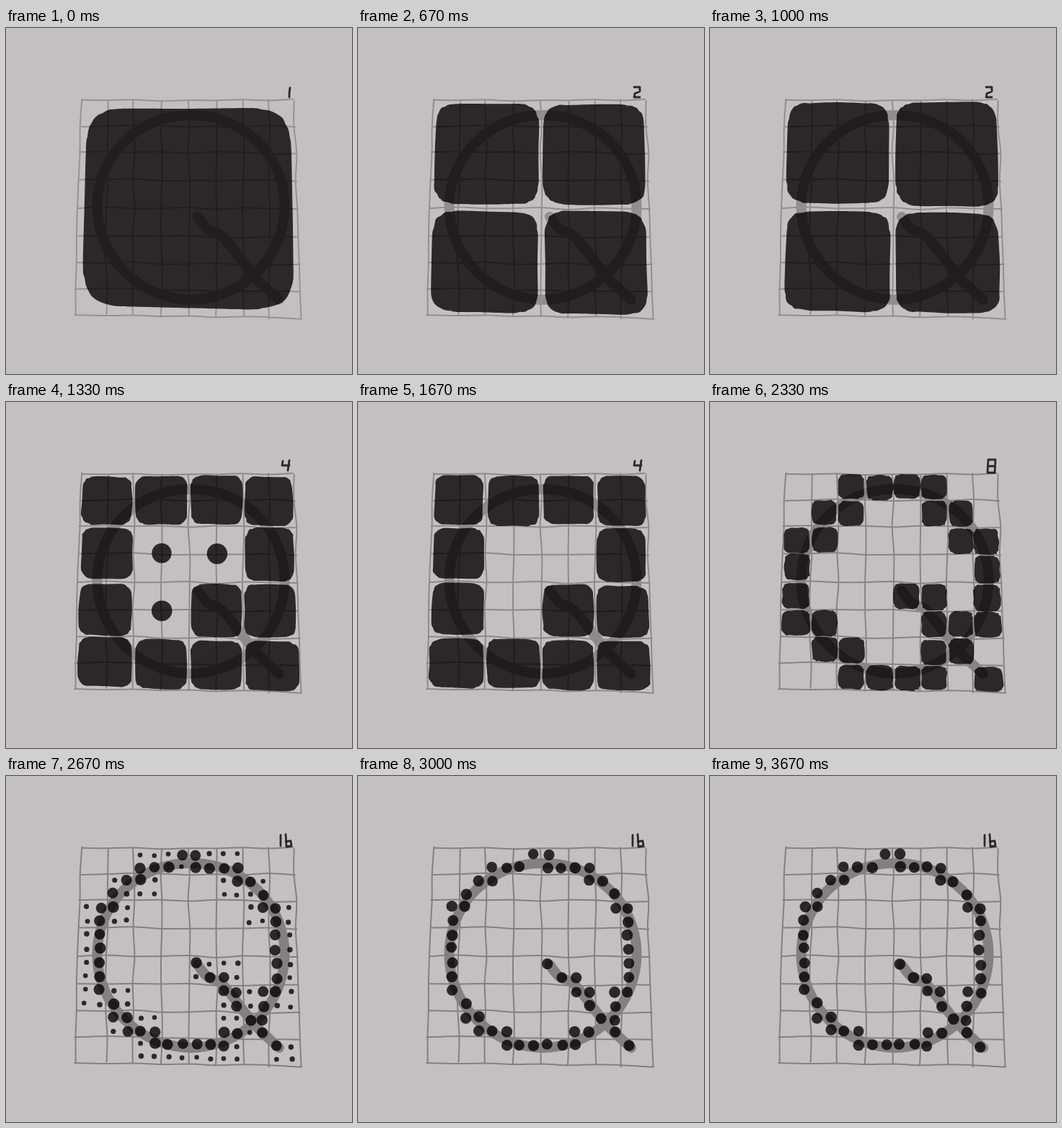
An HTML page with a canvas that plays this animation: 480 by 480 pixels, repeating every 4010 ms.

```html
<!DOCTYPE html>
<html lang="en">
<head>
<meta charset="utf-8">
<title>Q on a finer and finer grid</title>
<style>
html, body { margin: 0; width: 100%; height: 100%; overflow: hidden; background: #c4c0c1; }
canvas { display: block; width: 480px; height: 480px; }
</style>
</head>
<body>
<canvas id="stage" width="480" height="480"></canvas>
<script>
const SIZE = 480, LOOP = 4010, POSE_COUNT = 12;
const PAPER = '#c4c0c1', INK = '#2c2829';
const { PI, sin, cos, abs, sign, floor, hypot } = Math;
const ctx = document.getElementById('stage').getContext('2d');

const range = n => Array.from({ length: n }, (_, i) => i);

// Seeded values between -1 and 1.
function randomFrom(seed) {
  let s = seed * 7919 + 17;
  const next = () => {
    s = (s * 16807) % 2147483647;
    return s / 2147483647 * 2 - 1;
  };
  next();
  return next;
}

// Hand-drawn square: u and v run from 0 to 1, the outer sides flare downwards.
function warp(u, v) {
  return [
    104 + 294 * u + 2.2 - 2.8 * sin(2 * PI * u + 0.3) + 10 * v * (2 * u - 1) ** 7,
    100 + 297 * v + 6 * u * v - 2 * sin(2 * PI * v)
  ];
}

function unwarp(x, y) {
  let u = (x - 104) / 294, v = (y - 100) / 300;
  for (let i = 0; i < 5; i++) {
    const [wx, wy] = warp(u, v);
    u += (x - wx) / 294;
    v += (y - wy) / 300;
  }
  return [u, v];
}

// The letter: a slightly flattened ring and a bent tail.
const TAIL = [[266, 262], [280, 279], [302, 291], [345, 345], [379, 377]];

function ring(a) {
  const r = 1 - 0.015 * sin(a) * abs(cos(a));
  return [256.5 + 130 * r * cos(a), 249 + 128 * r * sin(a)];
}

function letterSamples() {
  const samples = range(800).map(i => ring(i / 800 * 2 * PI));
  TAIL.slice(1).forEach(([x, y], i) => {
    const [px, py] = TAIL[i], length = hypot(x - px, y - py);
    for (let d = 0; d < length; d++)
      samples.push([px + (x - px) * d / length, py + (y - py) * d / length]);
  });
  return samples;
}

// The cells follow the letter from a little up and to the left.
const LETTER_UV = letterSamples().map(([x, y]) => unwarp(x - 4, y - 4));

// Cells of an n by n grid that the letter crosses for more than a touch.
function crossedCells(n) {
  const counts = new Map();
  for (const [u, v] of LETTER_UV) {
    const key = floor(v * n) * n + floor(u * n);
    counts.set(key, (counts.get(key) || 0) + 1);
  }
  const least = 295 / n * 0.13;
  return new Set([...counts.keys()].filter(key => counts.get(key) > least));
}
const crossed = Object.fromEntries([1, 2, 4, 8, 16].map(n => [n, crossedCells(n)]));

// Cells left empty inside the crossed cells of the coarser grid.
function emptyCells(n) {
  const half = n / 2;
  return range(n * n).filter(key => {
    const parent = floor(key / n / 2) * half + floor(key % n / 2);
    return crossed[half].has(parent) && !crossed[n].has(key);
  });
}

const cellCentre = (key, n) => [(key % n + 0.5) / n, (floor(key / n) + 0.5) / n];

function trace(c, points, closed) {
  const n = points.length;
  const at = i => closed ? points[(i + n) % n] : points[Math.max(0, Math.min(n - 1, i))];
  c.beginPath();
  c.moveTo(...points[0]);
  for (const i of range(closed ? n : n - 1)) {
    const [a, b, d, e] = [at(i - 1), at(i), at(i + 1), at(i + 2)];
    c.bezierCurveTo(b[0] + (d[0] - a[0]) / 6, b[1] + (d[1] - a[1]) / 6,
      d[0] - (e[0] - b[0]) / 6, d[1] - (e[1] - b[1]) / 6, ...d);
  }
  if (closed) c.closePath();
}

function makeOverlay() {
  const layer = document.createElement('canvas');
  layer.width = layer.height = SIZE;
  const c = layer.getContext('2d');
  c.lineCap = c.lineJoin = 'round';
  const stroke = (points, width, closed) => {
    c.lineWidth = width;
    trace(c, points, closed);
    c.stroke();
  };
  const random = randomFrom(5);
  for (const line of range(9)) {
    const wobble = ([x, y]) => [x + random() * 1.5, y + random() * 1.5];
    stroke(range(9).map(i => wobble(warp(line / 8, i / 8))), 2);
    stroke(range(9).map(i => wobble(warp(i / 8, line / 8))), 2);
  }
  stroke(range(40).map(i => ring(i / 40 * 2 * PI)), 14, true);
  stroke(TAIL, 14);
  return layer;
}
const overlay = makeOverlay();

// Rounded square bent with the grid; corners soften as the cells shrink.
function drawBlobs(n, seed) {
  const random = randomFrom(seed), power = 7.2 - Math.log2(n);
  const bend = t => sign(t) * abs(t) ** (2 / power);
  const count = n < 4 ? 44 : 28;
  for (const key of crossed[n]) {
    const [u, v] = cellCentre(key, n);
    const [dx, dy] = [random(), random()];
    const [w, h] = [0, 0].map(() => (0.94 + random() * 0.02) / n / 2);
    trace(ctx, range(count).map(i => {
      const a = i / count * 2 * PI;
      const [x, y] = warp(u + bend(cos(a)) * w, v + bend(sin(a)) * h);
      return [x + dx + random() * 0.8, y + dy + random() * 0.8];
    }), true);
    ctx.fill();
  }
}

function drawDots(cells, n, radius, seed) {
  const random = randomFrom(seed);
  for (const key of cells) {
    const [x, y] = warp(...cellCentre(key, n));
    ctx.beginPath();
    ctx.arc(x + random() * 1.5, y + random() * 1.5, radius + random() * 0.3, 0, 2 * PI);
    ctx.fill();
  }
}

// Each numeral is a list of pen strokes.
const NUMERALS = {
  1: [[[394, 83], [393, 90], [393, 96]]],
  2: [[[383, 82], [391, 82], [391, 88], [384, 91], [383, 96], [391, 96]]],
  4: [[[384, 82], [383, 88], [393, 88]], [[393, 81], [391, 95]]],
  8: [[[386, 80], [396, 80], [395, 98], [385, 98], [386, 80]], [[386, 89], [395, 89]]],
  16: [[[381, 82], [381, 97]], [[388, 81], [389, 98], [396, 97], [395, 90], [388, 91]]]
};

function writeNumeral(n) {
  ctx.lineWidth = 2.8;
  ctx.lineCap = ctx.lineJoin = 'round';
  for (const line of NUMERALS[n]) {
    ctx.beginPath();
    line.forEach(p => ctx.lineTo(...p));
    ctx.stroke();
  }
}

// Two poses per grid, first with its empty cells dotted; the finest grid keeps jittering.
function drawPose(index) {
  const level = Math.min(4, floor(index / 2)), n = 2 ** level;
  const dotted = index === level * 2 && n > 1;
  ctx.globalAlpha = 1;
  ctx.fillStyle = PAPER;
  ctx.fillRect(0, 0, SIZE, SIZE);
  ctx.fillStyle = ctx.strokeStyle = INK;
  if (n < 16) drawBlobs(n, index + 1);
  else drawDots(crossed[n], n, 7.6, index + 1);
  if (dotted) drawDots(emptyCells(n), n, 295 / n * 0.19, index + 20);
  writeNumeral(n);
  ctx.globalAlpha = 0.23 + 0.025 * level;
  ctx.drawImage(overlay, 0, 0);
}

// Poses change on hundredths of a second, spread evenly over four seconds.
const poseStart = i => Math.round(i * 400 / POSE_COUNT) * 10;

let shown = -1;
function tick() {
  const time = performance.now() % LOOP;
  const index = range(POSE_COUNT).filter(i => poseStart(i) <= time).length - 1;
  if (index !== shown) drawPose(shown = index);
  requestAnimationFrame(tick);
}
tick();
</script>
</body>
</html>
```
